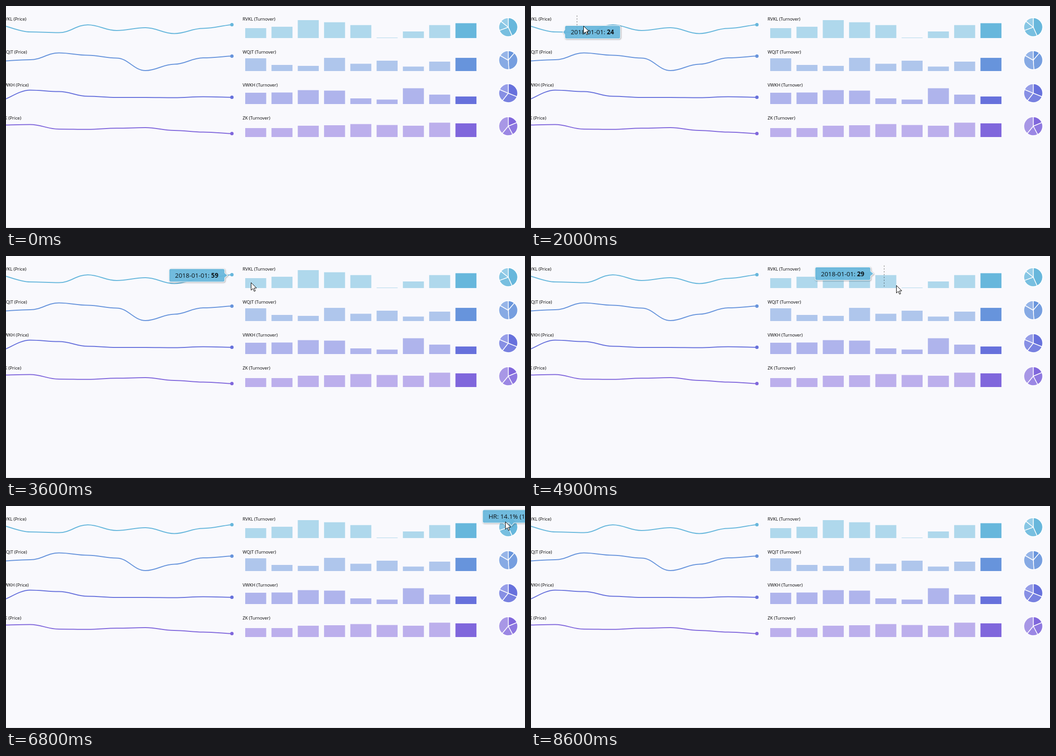
Recreate the animation shown at these times as an HTML page with a canvas. Size 1100 by 471 pixels, loop 9.3 s.

```html
<!DOCTYPE html>
<html lang="en">
<head>
<meta charset="utf-8">
<title>Sparkline charts</title>
<style>
html, body { margin: 0; width: 100%; height: 100%; overflow: hidden; background: #f9f9fd; }
canvas { display: block; }
</style>
</head>
<body>
<canvas id="stage" width="1100" height="471"></canvas>
<script>
const ctx = document.getElementById('stage').getContext('2d');
const LOOP = 9300, STEP = 100;
const FONT = '"Open Sans", "Noto Sans", sans-serif';
const LINE_X = -10, LINE_STEP = 61.1;
const BAR_X = 507, BAR_STEP = 55.7, BAR_W = 44.5;
const PIE = { x: 1064.5, y: 45, r: 20 };

// line: heights of the curve; bars: tops; cuts: slice borders in degrees
const rows = [
  { name: 'RVKL', color: '#67b7dc',
    line: [41.1, 55, 56.5, 40, 52, 46, 58.5, 47.5, 39.7],
    bars: [47, 44, 30, 34.5, 40.5, 67, 54, 40.5, 36.5], cuts: [0, 156, 250, 309, 360] },
  { name: 'WQJT', color: '#6794dc',
    line: [46.9, 44, 29.5, 34.5, 40.5, 67, 53.5, 40, 36.3],
    bars: [41, 55, 57, 40, 52.5, 46, 58.5, 48, 40], cuts: [0, 40, 176, 300, 360] },
  { name: 'VWKH', color: '#6771dc',
    line: [59.9, 38.5, 41.5, 51.5, 54, 54, 54.5, 52.5, 53.7],
    bars: [44, 43.5, 38.5, 39.5, 56, 58.5, 34.5, 48, 52], cuts: [0, 112, 218, 293, 360] },
  { name: 'ZK', color: '#8067dc',
    line: [42.7, 41.5, 51.2, 51.8, 49.3, 48, 54, 57.5, 60.7],
    bars: [49, 49, 44, 43, 40.5, 42.5, 44, 37.5, 39], cuts: [0, 67, 152, 220, 360] }
];
const teams = [['Sales', 507], ['Production', 305], ['Administration', 193], ['HR', 165]];

// pointer path: time, x, y
const path = [
  [300, 1070, 50], [400, 760, 46], [500, 420, 40], [550, 325, 37], [730, 265, 33],
  [800, 220, 32], [900, 169, 33], [1000, 120, 35], [1100, 75, 37], [1200, 40, 38],
  [1500, 12, 40], [1700, 45, 41], [1835, 81, 41], [1900, 97, 42], [2000, 111, 42],
  [2200, 137, 42], [3100, 378, 49], [3200, 403, 50], [3300, 450, 52], [3500, 490, 55],
  [3600, 519, 56], [4200, 625, 56], [4675, 724, 61], [4800, 748, 62], [4900, 774, 62],
  [5200, 883, 63], [5600, 990, 61], [5900, 1048, 50], [6200, 1062, 49], [6400, 1075, 43],
  [6600, 1068, 36], [6700, 1062, 34], [6800, 1058, 33], [7200, 1054, 41], [7400, 1055, 50],
  [7600, 1064, 60], [7800, 1058, 54], [8000, 1053, 46], [8200, 1052, 46]
];
const START = 300, END = 8200;

const lerp = (a, b, k) => a + (b - a) * k;
const rad = deg => (deg - 90) * Math.PI / 180;

function pointer(t) {
  if (t < START || t >= END) return null;
  const i = path.findIndex(p => p[0] > t);
  const a = path[i - 1], b = path[i], k = (t - a[0]) / (b[0] - a[0]);
  return { x: lerp(a[1], b[1], k), y: lerp(a[2], b[2], k) };
}

// chart item under the pointer at a given time
function hit(t) {
  const m = pointer(t);
  if (!m) return null;
  const r = rows[0], date = '2018-01-01: ';
  if (m.x < 500) {
    const i = Math.max(0, Math.min(8, Math.round((m.x - LINE_X) / LINE_STEP)));
    return { kind: 'line', x: LINE_X + i * LINE_STEP, y: r.line[i], left: i > 4,
      text: date, bold: Math.round(59 - (r.line[i] - 39.7) * 2.08) };
  }
  if (m.x > 502 && m.x < 1002) {
    const i = Math.min(8, Math.floor((m.x - 502) / BAR_STEP));
    return { kind: 'bar', x: BAR_X + i * BAR_STEP + BAR_W / 2, y: r.bars[i], left: true,
      text: date, bold: Math.round((68 - r.bars[i]) * 1.055) };
  }
  const dx = m.x - PIE.x, dy = m.y - PIE.y;
  if (t > 5500 && Math.hypot(dx, dy) < PIE.r) {
    const deg = (Math.atan2(dy, dx) * 180 / Math.PI + 450) % 360;
    const i = r.cuts.findIndex(c => c > deg) - 1;
    const mid = rad((r.cuts[i] + r.cuts[i + 1]) / 2), [name, n] = teams[i];
    return { kind: 'pie', x: PIE.x + Math.cos(mid) * PIE.r / 2, y: PIE.y + Math.sin(mid) * PIE.r / 2,
      text: `${name}: ${(n / 11.7).toFixed(1)}% (${n})`, bold: '' };
  }
  return null;
}

function drawLine(r, top) {
  const px = i => LINE_X + i * LINE_STEP;
  ctx.strokeStyle = ctx.fillStyle = r.color;
  ctx.lineWidth = 2;
  ctx.beginPath();
  ctx.moveTo(px(0), top + r.line[0]);
  for (let i = 1; i < 9; i++) {
    const a = LINE_STEP * (i === 1 ? 0.2 : 0.4), b = LINE_STEP * (i === 8 ? 0.2 : 0.4);
    const y0 = top + r.line[i - 1], y1 = top + r.line[i];
    ctx.bezierCurveTo(px(i - 1) + a, y0, px(i) - b, y1, px(i), y1);
  }
  ctx.stroke();
  ctx.beginPath();
  ctx.arc(px(8), top + r.line[8], 3.6, 0, 7);
  ctx.fill();
}

function drawBars(r, top) {
  ctx.fillStyle = r.color;
  r.bars.forEach((y, i) => {
    ctx.globalAlpha = i === 8 ? 1 : 0.5;
    ctx.fillRect(BAR_X + i * BAR_STEP, top + y, BAR_W, 68 - y);
  });
  ctx.globalAlpha = 1;
}

function drawPie(r, top) {
  ctx.fillStyle = r.color;
  ctx.strokeStyle = '#fff';
  ctx.lineWidth = 1.5;
  for (let i = 0; i < 4; i++) {
    ctx.beginPath();
    ctx.moveTo(PIE.x, top + PIE.y);
    ctx.arc(PIE.x, top + PIE.y, PIE.r, rad(r.cuts[i]), rad(r.cuts[i + 1]));
    ctx.closePath();
    ctx.globalAlpha = 1 - i * 0.11;
    ctx.fill();
    ctx.globalAlpha = 1;
    ctx.stroke();
  }
}

function drawCharts() {
  ctx.fillStyle = '#f9f9fd';
  ctx.fillRect(0, 0, 1100, 471);
  ctx.fillStyle = '#dcdce0';
  ctx.fillRect(0, 470, 1100, 1);
  rows.forEach((r, i) => {
    const top = i * 70;
    drawLine(r, top);
    drawBars(r, top);
    drawPie(r, top);
    ctx.fillStyle = '#000';
    ctx.font = '9.4px ' + FONT;
    ctx.fillText(r.name + ' (Price)', -8.5, top + 30.5);
    ctx.fillText(r.name + ' (Turnover)', 501.5, top + 30.5);
  });
}

function drawGuide(m) {
  if (!m || m.x > 1002 || (m.x > 483 && m.x < 502)) return;
  const x = Math.floor(m.x) + 0.5;
  ctx.strokeStyle = 'rgba(0,0,0,.5)';
  ctx.lineWidth = 1;
  ctx.setLineDash([3, 3]);
  ctx.beginPath();
  ctx.moveTo(x, 20);
  ctx.lineTo(x, 66);
  ctx.stroke();
  ctx.setLineDash([]);
}

function bubble(x, y, w, h, tip) {
  const c = 3, r = x + w, b = y + h;
  ctx.beginPath();
  ctx.moveTo(x + c, y);
  ctx.arcTo(r, y, r, b, c);
  if (tip.side === 'right') {
    ctx.lineTo(r, tip.y - 5);
    ctx.lineTo(tip.x, tip.y);
    ctx.lineTo(r, tip.y + 5);
  }
  ctx.arcTo(r, b, x, b, c);
  if (tip.side === 'bottom') {
    ctx.lineTo(tip.x + 5, b);
    ctx.lineTo(tip.x, tip.y);
    ctx.lineTo(tip.x - 5, b);
  }
  ctx.arcTo(x, b, x, y, c);
  if (tip.side === 'left') {
    ctx.lineTo(x, tip.y + 5);
    ctx.lineTo(tip.x, tip.y);
    ctx.lineTo(x, tip.y - 5);
  }
  ctx.arcTo(x, y, r, y, c);
  ctx.closePath();
}

function drawTooltip(t) {
  const now = hit(t);
  if (!now) return;
  // glide towards the current item
  let x = 0, y = 0, n = 0;
  for (let d = 0; d < 250; d += 10) {
    const h = hit(t - d);
    if (!h || h.kind !== now.kind) break;
    x += h.x; y += h.y; n++;
  }
  x /= n; y /= n;

  const plain = '13.33px ' + FONT, heavy = 'bold ' + plain;
  ctx.font = plain;
  const tw = ctx.measureText(now.text).width;
  ctx.font = heavy;
  const w = tw + ctx.measureText(now.bold).width + 25, h = 27;
  const pie = now.kind === 'pie';
  const side = pie ? 'bottom' : now.left ? 'right' : 'left';
  const bx = pie ? x - w / 2 : now.left ? x - 6 - w : x + 4;
  const by = pie ? y - 6 - h : y - h / 2;

  bubble(bx, by, w, h, { x, y, side });
  ctx.save();
  ctx.shadowColor = 'rgba(0,0,0,.4)';
  ctx.shadowBlur = 3;
  ctx.shadowOffsetX = ctx.shadowOffsetY = 1;
  ctx.strokeStyle = '#fff';
  ctx.lineWidth = 2;
  ctx.stroke();
  ctx.restore();
  ctx.globalAlpha = 0.92;
  ctx.fillStyle = rows[0].color;
  ctx.fill();
  ctx.globalAlpha = 1;

  ctx.fillStyle = '#0b1216';
  ctx.font = plain;
  ctx.fillText(now.text, bx + 12, by + 18.5);
  ctx.font = heavy;
  ctx.fillText(now.bold, bx + 12 + tw, by + 18.5);
}

function drawPointer(m) {
  if (!m) return;
  const x = Math.round(m.x) + 0.5, y = Math.round(m.y) + 0.5;
  const shape = [[0, 0], [0, 16], [4, 12.5], [6.5, 18.5], [9, 17.5], [6.5, 11.5], [11.5, 11.5]];
  ctx.beginPath();
  shape.forEach(([dx, dy]) => ctx.lineTo(x + dx, y + dy));
  ctx.closePath();
  ctx.fillStyle = '#fff';
  ctx.fill();
  ctx.strokeStyle = '#000';
  ctx.lineWidth = 1;
  ctx.stroke();
}

function frame(now) {
  const t = Math.floor((now % LOOP) / STEP) * STEP;
  drawCharts();
  const m = pointer(t);
  if (m) {
    drawGuide(pointer(t - 100));
    drawTooltip(t - 100);
    drawPointer(m);
  }
  requestAnimationFrame(frame);
}
requestAnimationFrame(frame);
</script>
</body>
</html>
```
